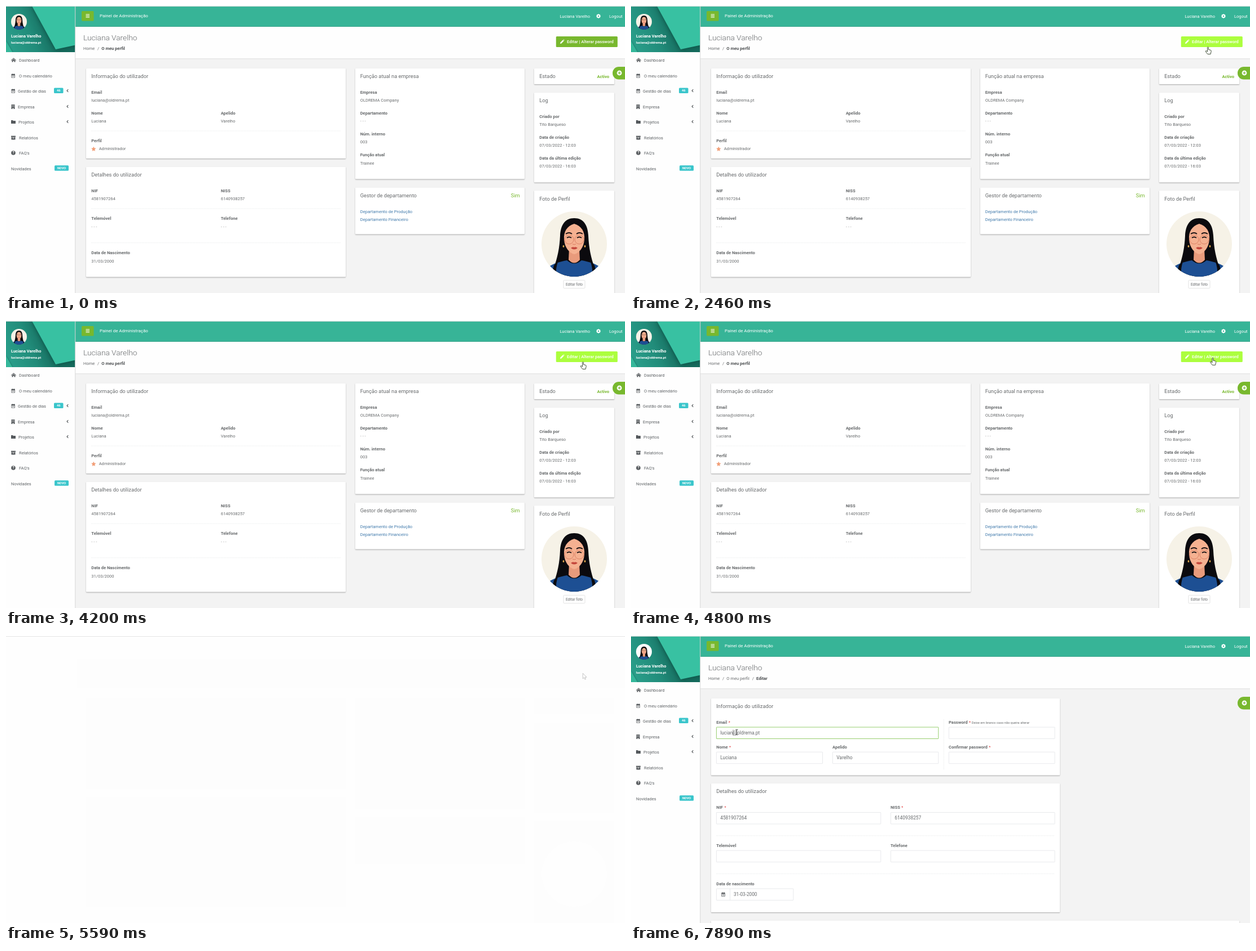
An HTML page with a canvas for the animation above (8000 ms loop, 1097 by 510 pixels).

```html
<!DOCTYPE html>
<html lang="pt">
<head>
<meta charset="utf-8">
<title>Painel de Administração</title>
<style>
html, body { margin: 0; width: 100%; height: 100%; overflow: hidden; background: #fefefe; }
canvas { display: block; width: 1097px; height: 510px; }
</style>
</head>
<body>
<canvas id="stage"></canvas>
<script>
const W = 1097, H = 510, LOOP = 8000;
const canvas = document.getElementById('stage');
const ratio = window.devicePixelRatio || 1;
canvas.width = W * ratio;
canvas.height = H * ratio;
const c = canvas.getContext('2d');

const FIRST = 'Luciana', LAST = 'Varelho', FULL = FIRST + ' ' + LAST;
const MAIL = 'luciana@oldrema.pt', MAIL_CUT = 'lucian@oldrema.pt';
const NIF = '4581907264', NISS = '6140938257';
const GRAY = '#676a6c', GREEN = '#78b82e', TEAL = '#37b497', AQUA = '#3ac5cb';

const clamp = v => Math.max(0, Math.min(1, v));
const ramp = (t, a, b) => clamp((t - a) / (b - a));
const mix = (a, b, k) => `rgb(${a.map((v, i) => Math.round(v + (b[i] - v) * k))})`;

function rect(x, y, x2, y2, fill) {
  c.fillStyle = fill;
  c.fillRect(x, y, x2 - x, y2 - y);
}

function round(x, y, x2, y2, r, fill, stroke) {
  c.beginPath();
  c.roundRect(x, y, x2 - x, y2 - y, r);
  if (fill) { c.fillStyle = fill; c.fill(); }
  if (stroke) { c.strokeStyle = stroke; c.lineWidth = 0.8; c.stroke(); }
}

function disc(x, y, rx, ry, fill) {
  c.beginPath();
  c.ellipse(x, y, rx, ry, 0, 0, 7);
  c.fillStyle = fill;
  c.fill();
}

function path(d, x, y, fill, stroke, width = 1) {
  const p = new Path2D(d);
  c.save();
  c.translate(x, y);
  if (fill) { c.fillStyle = fill; c.fill(p, 'evenodd'); }
  if (stroke) { c.strokeStyle = stroke; c.lineWidth = width; c.lineJoin = 'round'; c.stroke(p); }
  c.restore();
}

// y is the middle of the capital letters
function text(s, x, y, { size = 7.55, weight = 400, color = GRAY, align = 'left' } = {}) {
  c.font = `${weight} ${size}px Roboto, sans-serif`;
  c.fillStyle = color;
  c.textAlign = align;
  c.fillText(s, x, y + size * 0.355);
  return c.measureText(s).width;
}
const title = (s, x, y) => text(s, x, y, { size: 9.25 });
const label = (s, x, y) => text(s, x, y, { weight: 700 });
function pair(name, value, x, y) {
  label(name, x, y);
  text(value, x, y + 14.2, value === '- - -' ? { color: '#999' } : {});
}

function card(x, y, x2, y2) {
  c.save();
  c.shadowColor = 'rgba(0,0,0,.32)';
  c.shadowBlur = 2 * ratio;
  c.shadowOffsetY = 1 * ratio;
  round(x, y, x2, y2, 1, '#fff');
  c.restore();
}

function dashes(x, y, x2, y2) {
  c.beginPath();
  c.setLineDash([1.5, 1]);
  c.moveTo(x, y);
  c.lineTo(x2, y2);
  c.strokeStyle = '#e4e7e9';
  c.lineWidth = 0.7;
  c.stroke();
  c.setLineDash([]);
}

function portrait(cx, cy, r, alt) {
  c.save();
  c.beginPath();
  c.arc(cx, cy, r, 0, 7);
  c.clip();
  c.translate(cx, cy);
  c.scale(r / 58, r / 58);
  c.fillStyle = alt ? '#fff' : '#f6f2e7';
  c.fillRect(-60, -60, 120, 120);
  if (alt) { c.translate(0, 5); c.scale(0.92, 0.95); }
  path('M0-46C-17-46-24-33-25-15C-26 8-30 25-36 42L-30 62L30 62L36 42C30 25 26 8 25-15C24-33 17-46 0-46Z', 0, 0, '#0b0a0e');
  path('M-58 66C-56 40-38 34-13 29Q0 40 13 29C38 34 56 40 58 66Z', 0, 0, '#1d4f93');
  path('M-9 8L-10 28Q0 39 10 28L9 8Z', 0, 0, '#e99b7c');
  path('M0-36C-13-32-19-22-18-8C-17 6-9 16 0 18C9 16 17 6 18-8C19-22 13-32 0-36Z', 0, 0, '#f5b191');
  path('M-25 24Q-35 40-31 62L-42 62L-36 38ZM25 24Q35 40 31 62L42 62L36 38Z', 0, 0, '#0b0a0e');
  path('M-15-18Q-9-22-4-18M4-18Q9-22 15-18', 0, 0, null, '#1b1314', 1.9);
  path('M-13-11Q-9-14-5-11M5-11Q9-14 13-11', 0, 0, null, '#1b1314', 2);
  path('M-17-8A8 8 0 1 0-1-8A8 8 0 1 0-17-8M1-8A8 8 0 1 0 17-8A8 8 0 1 0 1-8', 0, 0, null, '#d87d62', 0.9);
  path('M-3 0Q0 2 3 0', 0, 0, null, '#d87d62', 1);
  path('M-6 7Q-2 4 0 6Q2 4 6 7Q0 12-6 7Z', 0, 0, '#c4473c');
  disc(-19, 4, 1.4, 2, '#dda64c');
  disc(19, 4, 1.4, 2, '#dda64c');
  c.restore();
}

function calendar(x, y) {
  path('M-3.2-3H3.2V3.5H-3.2ZM-2.4-.8V2.7H2.4V-.8ZM-2-4H-1V-3H-2ZM1-4H2V-3H1Z', x, y, '#55595c');
  rect(x - 1.5, y + 0.3, x + 1.5, y + 1.3, '#55595c');
}

function gear(x, y) {
  for (let i = 0; i < 8; i++) {
    c.save();
    c.translate(x, y);
    c.rotate(i * Math.PI / 4);
    rect(-0.8, -3.8, 0.8, -2, '#fff');
    c.restore();
  }
  disc(x, y, 2.9, 2.9, '#fff');
  disc(x, y, 1.2, 1.2, TEAL);
}

function badge(x, y, x2, s) {
  round(x, y, x2, y + 9.6, 1.5, AQUA);
  text(s, (x + x2) / 2, y + 4.8, { size: 5.6, weight: 700, color: '#fff', align: 'center' });
}

function sidebar(loading, alt) {
  rect(0, 1, 122.5, H, '#fefefe');
  c.save();
  c.beginPath();
  c.rect(0, 1, 122.5, 81);
  c.clip();
  const g = c.createLinearGradient(0, 62, 76, 32);
  g.addColorStop(0, '#2a9f8b');
  g.addColorStop(0.55, '#218c7a');
  g.addColorStop(1, '#156a5c');
  rect(0, 1, 123, 82, g);
  c.shadowColor = 'rgba(0,50,40,.55)';
  c.shadowBlur = 9 * ratio;
  path('M46 0H130V68L88 77Z', 0, 0, '#38c1a2');
  c.shadowBlur = 3 * ratio;
  path('M0 62L12 83H0Z', 0, 0, '#35b79a');
  c.restore();
  portrait(23, 28, 14, alt);
  text(FULL, 9, 53, { weight: 700, color: '#fff', size: 7.4 });
  text(MAIL, 9, 65.3, { weight: 700, color: '#fff', size: 5.9 });

  const ink = '#55595c';
  path('M-4.5.3L0-3.7L4.5.3L3.8.9L0-2.5L-3.8.9ZM-3 1L0-1.7L3 1V3.5H1V1.4H-1V3.5H-3Z', 13.5, 96, ink);
  calendar(12.7, 124);
  calendar(12.7, 151);
  path('M-3-4H3V4H.8V2H-.8V4H-3ZM-1.8-3V-2H-.6V-3ZM.6-3V-2H1.8V-3ZM-1.8-1V0H-.6V-1ZM.6-1V0H1.8V-1Z', 12.5, 179, ink);
  path('M-4-3H-1L0-2H4V3H-4Z', 13, 206, ink);
  path('M-4-3.3H4V-1.3H-4ZM-3.5-.8H3.5V3.5H-3.5ZM-1.3.1V.9H1.3V.1Z', 13, 234, ink);
  disc(13, 261, 3.8, 3.8, ink);
  text('?', 13, 261.2, { size: 6.4, weight: 700, color: '#fff', align: 'center' });
  const items = [['Dashboard', 23, 96], ['O meu calendário', 23, 124], ['Gestão de dias', 21, 151],
    ['Empresa', 21, 179], ['Projetos', 22, 206], ['Relatórios', 23, 234],
    ["FAQ's", 23, 261], ['Novidades', 9, 289]];
  for (const [s, x, y] of loading ? items.slice(0, 6) : items) text(s, x, y, { color: '#5f6366' });
  badge(85, 145.4, 101.5, '46');
  if (!loading) badge(86, 283.2, 111, 'NOVO');
  for (const y of [150.5, 178.5, 205.5]) path('M1.3-2.3L-1 0L1.3 2.3', 109, y, null, ink, 1.1);
  rect(122.2, 1, 123.2, H, '#d9d9d9');
}

function shell(crumbs) {
  rect(122, 1, W, H, '#f3f3f3');
  rect(122, 37, W, 93.3, '#fefefe');
  rect(122, 93.3, W, 94.3, '#dedede');
  rect(122, 1, W, 36.5, TEAL);
  rect(122, 36.2, W, 37, '#2d9c83');
  round(134, 9, 155.5, 26.5, 1.5, GREEN);
  for (const y of [14.5, 17, 19.5]) rect(141.5, y, 148, y + 1.1, '#fff');
  const white = { color: '#fff' };
  text('Painel de Administração', 166, 17, { size: 7.95, color: '#fff' });
  text(FULL, 1035, 18, { color: '#fff', align: 'right' });
  gear(1050, 18);
  text('Logout', 1069, 18, white);
  text(FULL, 137, 56, { size: 13.7, weight: 300 });
  crumbs.forEach(([s, x], i) => {
    const last = i === crumbs.length - 1;
    text(s, x, 75.7, last ? { weight: 700, color: '#4c4f51' } : {});
    if (!last) text('/', crumbs[i + 1][1] - 7.2, 75.7);
  });
}

function plusTab() {
  round(1075, 108, 1110, 130.5, 11, GREEN);
  disc(1087, 119, 4.4, 4.4, '#fff');
  rect(1084.5, 118.4, 1089.5, 119.6, GREEN);
  rect(1086.4, 116.5, 1087.6, 121.5, GREEN);
}

const profileCards = [[142, 111, 602, 271], [142, 286, 602, 481.5], [619, 111, 919, 307.5],
  [619, 322.5, 919, 405.5], [936, 111, 1078, 139], [936, 154, 1078, 313.5], [936, 328, 1078, 530]];

function profilePage(glow) {
  shell([['Home', 137], ['O meu perfil', 169.3]]);
  round(974.8, 54, 1083.8, 73, 1.5, mix([120, 184, 46], [172, 254, 62], glow));
  path('M-3.5 3.5L-3 1.2L1.4-3.2L3.2-1.4L-1.2 3ZM2-3.8L2.7-4.2L4.2-2.7L3.8-2Z', 985.5, 63.5, '#fff');
  text('Editar | Alterar password', 994, 63.5, { color: '#fff', weight: 500 });
  profileCards.forEach(r => card(...r));

  title('Informação do utilizador', 151.3, 125);
  pair('Email', MAIL, 151.3, 153.2);
  pair('Nome', FIRST, 151.3, 190.2);
  pair('Apelido', LAST, 380.7, 190.2);
  dashes(151, 222, 593, 222);
  label('Perfil', 151.3, 239.5);
  path('M0-4.2L1.3-1.4L4.2-1.2L2 .9L2.6 3.9L0 2.4L-2.6 3.9L-2 .9L-4.2-1.2L-1.3-1.4Z', 155.3, 254, '#f29f78');
  text('Administrador', 164.7, 253.8);

  title('Detalhes do utilizador', 151.3, 300);
  pair('NIF', NIF, 151.3, 328.5);
  pair('NISS', NISS, 380.7, 328.5);
  dashes(151, 360, 593, 360);
  pair('Telemóvel', '- - -', 151.3, 377.8);
  pair('Telefone', '- - -', 380.7, 377.8);
  dashes(151, 420.7, 593, 420.7);
  pair('Data de Nascimento', '31/03/2000', 151.3, 438.7);

  title('Função atual na empresa', 627.7, 125);
  pair('Empresa', 'OLDREMA Company', 627.7, 153.2);
  pair('Departamento', '- - -', 627.7, 190.2);
  pair('Núm. interno', '003', 627.7, 227.5);
  pair('Função atual', 'Trainee', 627.7, 264.7);

  title('Gestor de departamento', 627.7, 336.7);
  text('Sim', 910.5, 336.7, { size: 9.25, color: GREEN, align: 'right' });
  text('Departamento de Produção', 627.7, 365, { color: '#3f79ab' });
  text('Departamento Financeiro', 627.7, 379.3, { color: '#3f79ab' });

  title('Estado', 945.3, 125);
  text('Activo', 1069, 125, { weight: 700, color: GREEN, align: 'right' });
  title('Log', 945.3, 168);
  pair('Criado por', 'Tito Barqueso', 945.3, 196.5);
  pair('Data de criação', '07/03/2022 - 12:03', 945.3, 233.6);
  pair('Data da última edição', '07/03/2022 - 16:03', 945.3, 270.6);
  title('Foto de Perfil', 945.3, 342.3);
  portrait(1007, 423, 58);
  round(988, 487.3, 1026, 501.7, 1.5, '#fff', '#dcdcdc');
  text('Editar foto', 1007, 494.6, { size: 6.5, align: 'center' });
  plusTab();
}

function field(x, y, x2, value, border = '#e2e5e7') {
  round(x + 0.4, y, x2, y + 20.5, 0.5, '#fff', border);
  if (value) text(value, x + 7.2, y + 10, { size: 8.4 });
}

function starred(s, x, y) {
  label(s, x, y);
  c.font = '700 7.55px Roboto, sans-serif';
  text('*', x + c.measureText(s).width + 2.5, y, { size: 7, color: '#e23b3b' });
}

function editPage(t) {
  shell([['Home', 137], ['O meu perfil', 169.3], ['Editar', 222]]);
  card(142, 111, 760, 247.5);
  card(142, 262, 760, 491);
  card(142, 505.5, 1078, 530);

  title('Informação do utilizador', 151.3, 125);
  starred('Email', 151.3, 153.2);
  const mail = t < 7890 ? MAIL : MAIL_CUT;
  field(151, 162, 544.8, mail, mix([226, 229, 231], [125, 194, 74], ramp(t, 7000, 7360)));
  if (t >= 7100 && (t < 7620 || t >= 7890)) {
    c.font = '400 8.4px Roboto, sans-serif';
    const x = 158.4 + c.measureText(mail.split('@')[0]).width;
    rect(x, 166.5, x + 0.7, 177, '#444');
  }
  starred('Nome', 151.3, 197.5);
  field(151, 206.2, 339.5, FIRST);
  label('Apelido', 357, 197.5);
  field(357, 206.2, 544.8, LAST);
  dashes(554.3, 148, 554.3, 237);
  starred('Password', 563, 153.2);
  text('Deixe em branco caso não queira alterar', 603.7, 154, { size: 5.75 });
  field(563, 162, 751, '');
  starred('Confirmar password', 563, 197.5);
  field(563, 206.2, 751, '');

  title('Detalhes do utilizador', 151.3, 276);
  starred('NIF', 151.3, 304.5);
  field(151, 313.5, 442.7, NIF);
  starred('NISS', 460, 304.5);
  field(460, 313.5, 751, NISS);
  dashes(151, 354.8, 751, 354.8);
  label('Telemóvel', 151.3, 372.3);
  field(151, 381.2, 442.7, '');
  label('Telefone', 460, 372.3);
  field(460, 381.2, 751, '');
  dashes(151, 422.5, 751, 422.5);
  label('Data de nascimento', 151.3, 440);
  field(151, 449, 287.7, '');
  rect(175, 449, 175.8, 469.5, '#e2e5e7');
  calendar(163.5, 459.3);
  text('31-03-2000', 182, 459.3, { size: 8.2 });
  plusTab();
}

// [time, x, y] of the pointer's hot spot
const track = [[190, 1018, 492], [450, 1008, 270], [700, 990, 90], [940, 1036, 4], [1010, 1050, 12],
  [1230, 968, 36], [1430, 957, 82], [1630, 952, 19], [1770, 955, 26], [2000, 962, 82],
  [2200, 986, 68], [2460, 1022.5, 72.5], [4200, 1022.5, 72.5], [4800, 1031, 65.3], [5000, 1023.5, 66],
  [5590, 1023.5, 66], [6210, 239.7, 219.5], [6340, 228, 210], [6900, 190, 172], [7170, 187.3, 171], [8000, 187.3, 171]];

function pointerAt(t) {
  const i = track.findIndex(k => k[0] > t);
  const a = track[i - 1], b = track[i], k = ramp(t, a[0], b[0]);
  return [a[1] + (b[1] - a[1]) * k, a[2] + (b[2] - a[2]) * k];
}

const ARROW = 'M0 0V9.6L2.2 7.6L3.8 11L5.3 10.3L3.8 7H6.8Z';
const HAND = 'M-1 1Q0-.6 1 1V5L4.6 5.8Q6 6.3 5.7 8L4.6 13H-.6L-4.2 8.4Q-4.5 6.8-2.8 7.2L-1 8.6Z';
const BEAM = 'M-2-4.8Q0-4.8 0-3.9Q0-4.8 2-4.8M0-4V4M-2 4.8Q0 4.8 0 3.9Q0 4.8 2 4.8';

function pointer(t, blank) {
  if (t < 190) return;
  const [x, y] = pointerAt(t);
  const hand = t >= 2200 && t < 5450;
  const beam = t > 5660 && x < 545 && y > 161;
  if (beam) path(BEAM, x, y, null, '#222', 0.9);
  else if (hand) path(HAND, x, y, '#fff', blank ? '#2f7d32' : '#2b3a22', 0.9);
  else path(ARROW, x, y, '#fff', blank ? '#b5b5b5' : '#222', 0.8);
}

function draw(t) {
  c.setTransform(ratio, 0, 0, ratio, 0, 0);
  rect(0, 0, W, H, '#fefefe');
  const half = t >= 3930 && t < 4200;
  const empty = t >= 5590 && t < 5660;
  if (half || empty) {
    rect(126, 40, W, 93, '#fdfdfd');
    profileCards.forEach(r => rect(...r, '#fdfdfd'));
    disc(1007, 423, 58, 58, '#fefefe');
    if (half) sidebar(true, true);
  } else {
    const edit = t >= 5660;
    if (edit) editPage(t);
    else profilePage(ramp(t, 2200, 2350) - ramp(t, 5070, 5260));
    sidebar(false, edit);
  }
  rect(0, 0, W, 1, '#e4e4e4');
  pointer(t, half || empty);
}

const start = performance.now();
function tick() {
  draw((performance.now() - start) % LOOP);
  requestAnimationFrame(tick);
}
tick();
</script>
</body>
</html>
```
